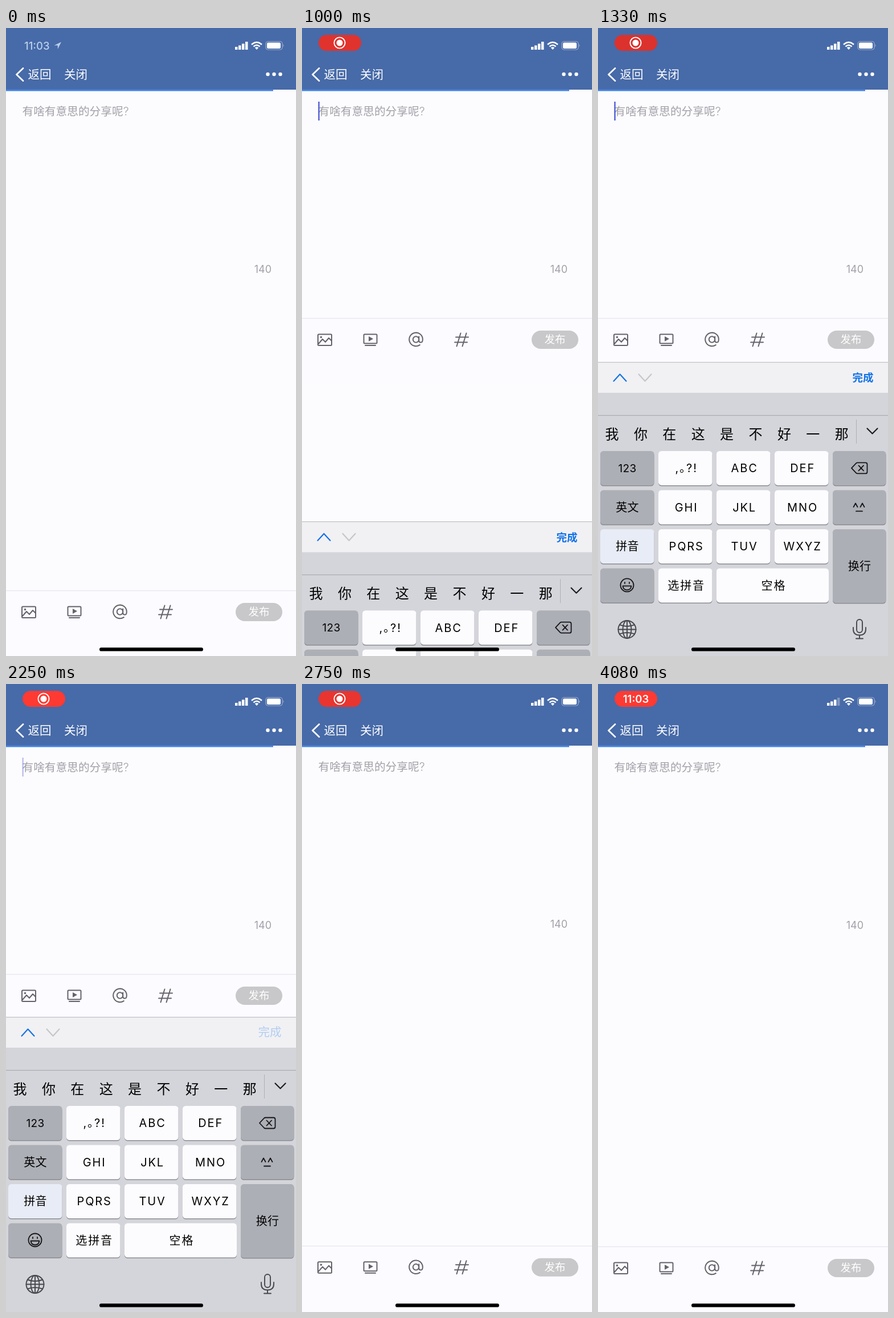
Animation, 509 px wide and 1100 px high, one loop 4160 ms. Source, as an HTML page:

```html
<!DOCTYPE html>
<html lang="zh-CN">
<head>
<meta charset="utf-8">
<style>
html, body { margin: 0; width: 100%; height: 100%; overflow: hidden; background: #fcfcfe; }
svg { display: block; width: 509px; height: 1100px; font-family: Inter, "Noto Sans CJK SC", "Noto Sans CJK", sans-serif; }
.line { fill: none; stroke-linecap: round; stroke-linejoin: round; }
</style>
</head>
<body>
<svg viewBox="0 0 509 1100">
  <rect width="509" height="1100" fill="#fcfcfe"/>
  <g id="content" fill="#a3a0a8"></g>
  <rect id="cursor" x="28.5" y="129" width="2.2" height="33" fill="#4450d0"/>

  <g id="toolbar">
    <rect width="509" height="117" fill="#fcfbff"/>
    <rect width="509" height="1.2" fill="#e6e5ef"/>
    <g class="line" stroke="#65636a" stroke-width="2">
      <rect x="28" y="28.5" width="24" height="19.5" rx="1.5"/>
      <path d="M29 45l7-8 5 5 6-7 5 5"/>
      <circle cx="33.5" cy="33.5" r=".8"/>
      <rect x="108.5" y="28.5" width="23" height="16" rx="1.5"/>
      <path d="M111 48h18"/>
      <circle cx="200" cy="37.5" r="5.2"/>
      <path d="M205.2 32.500v6.500q0 3.700 3.300 3.700 3.300 0 3.300-5.200a11.800 11.800 0 1 0-5 9.600"/>
      <path d="M270 33.5h22M268 42.5h22M278.5 26.5l-7 23M288.5 26.5l-7 23"/>
    </g>
    <path d="M117 32l8 4.5-8 4.5z" fill="#65636a"/>
    <rect x="403" y="22" width="82" height="32" rx="16" fill="#c8c8ca"/>
  </g>

  <g id="keyboard">
    <rect width="509" height="540" fill="#d4d5da"/>
    <rect width="509" height="54" fill="#f1f1f4"/>
    <rect width="509" height="1.2" fill="#bfc0c6"/>
    <rect y="93" width="509" height="1.2" fill="#a9abb1"/>
    <path class="line" d="M27.5 33.5l11-12 11 12" stroke="#1473e6" stroke-width="2.2"/>
    <path class="line" d="M71.5 21.5l11 12 11-12" stroke="#c6c6ca" stroke-width="2.2"/>
    <g id="candidates">
      <rect x="453" y="101" width="1" height="42" fill="#aeb0b6"/>
      <path class="line" d="M472.5 116.5l9 9 9-9" stroke="#1c1c1e" stroke-width="2.2"/>
    </g>
    <g id="keys"></g>
    <g class="line" stroke="#151518" stroke-width="1.8">
      <path d="M445 186l8-8.5q1-1 2.5-1h14q3 0 3 3v13q0 3-3 3h-14q-1.5 0-2.5-1zM457.5 181.5l8.5 9m0-9l-8.5 9"/>
      <path d="M448.5 254l3.5-6.5 3.5 6.5M460.5 254l3.5-6.5 3.5 6.5M453 261.5h11"/>
      <circle cx="51" cy="391" r="11.5"/>
      <path d="M43.5 392.5h15q-1 7-7.5 7t-7.5-7zM47 386v2M55 386v2"/>
    </g>
    <g class="line" stroke="#46474c" stroke-width="1.9">
      <circle cx="51" cy="468.5" r="15.5"/>
      <ellipse cx="51" cy="468.5" rx="7.5" ry="15.5"/>
      <path d="M51 453v31M35.5 468.5h31M38 460.5q13 5 26 0M38 476.5q13-5 26 0"/>
      <rect x="454" y="451" width="10" height="23" rx="5"/>
      <path d="M448 465v3q0 10.5 11 10.5t11-10.5v-3M459 478.5v6M453 484.5h12"/>
    </g>
  </g>

  <g id="header" fill="#fff">
    <rect width="509" height="108" fill="#476aa8"/>
    <rect y="107.5" width="469" height="3" fill="#4284e4"/>
    <path class="line" d="M30 70.5L18.5 81.5 30 92.5" stroke="#fff" stroke-width="2.8"/>
    <circle cx="459.5" cy="81" r="3.2"/><circle cx="470.5" cy="81" r="3.2"/><circle cx="481.5" cy="81" r="3.2"/>
    <path d="M402 33h4.5v5H402zM408 30.5h4.5V38H408zM414 27.5h4.5V38H414z"/>
    <path id="fullSignal" d="M420 24h4.5v14H420z"/>
    <path d="M431 29q9-8 18 0M434.5 32.5q5.5-5 11 0" fill="none" stroke="#fff" stroke-width="2.6"/>
    <path d="M436.8 34.5q3.2-2.5 6.4 0L440 38z"/>
    <rect x="456" y="23.5" width="29" height="14.5" rx="4" fill="none" stroke="#fff" stroke-opacity=".45" stroke-width="1.2"/>
    <rect x="458" y="25.5" width="24" height="10.5" rx="2.2"/>
    <path d="M486.5 28.5q2 2.2 0 4.5z" fill-opacity=".5"/>
    <g id="clock" fill="#bccfec"><path d="M97 24.5L84.5 30.5h6.3V37z"/></g>
    <rect id="pill" x="29" y="12" width="75" height="28" rx="14"/>
    <g id="record">
      <circle cx="66" cy="26" r="9.6" fill="none" stroke="#fff" stroke-width="1.9"/>
      <circle cx="66" cy="26" r="5.5"/>
    </g>
    <g id="pillTime"></g>
  </g>
  <rect x="164" y="1085.3" width="182" height="6.2" rx="3.1" fill="#000"/>
</svg>
<script>
const $ = id => document.getElementById(id);

function add(parent, tag, attrs, text = '') {
  const node = document.createElementNS('http://www.w3.org/2000/svg', tag);
  for (const name in attrs) node.setAttribute(name, attrs[name]);
  node.textContent = text;
  return $(parent).appendChild(node);
}
// Text placed by the vertical centre of its glyphs
const label = (parent, text, x, cy, size, anchor = 'start', extra = {}) =>
  add(parent, 'text', { x, y: cy + size * 0.37, 'font-size': size, 'text-anchor': anchor, ...extra }, text);

label('content', '有啥有意思的分享呢?', 28.5, 146, 19.7, 'start', { 'font-weight': 300 });
label('content', '140', 466, 422, 18, 'end');
label('toolbar', '发布', 444, 37.5, 18.5, 'middle', { fill: '#fff', 'font-weight': 500 });
label('header', '返回', 38.5, 81, 20.5);
label('header', '关闭', 102, 81, 20.5);
label('clock', '11:03', 32, 31, 18.5, 'start', { 'font-weight': 500 });
label('pillTime', '11:03', 66.5, 26, 18.5, 'middle', { 'font-weight': 600 });
const done = label('keyboard', '完成', 483.5, 27.5, 18.5, 'end', { fill: '#1473e6' });
[...'我你在这是不好一那'].forEach((c, i) => label('candidates', c, 24.5 + 50.4 * i, 126, 24, 'middle'));

const GREY = '#adafb6', WHITE = '#fcfcfe', PALE = '#e8ecf6';
function key(text, col, row, fill = WHITE, w = 94.5, h = 60) {
  const x = 4 + 102 * col, y = 156 + 68.5 * row;
  const box = { x, width: w, height: h, rx: 5.5 };
  add('keys', 'rect', { ...box, y: y + 1.6, fill: '#8b8d93' });
  add('keys', 'rect', { ...box, y, fill });
  const spacing = fill === WHITE ? 1.9 : 0.3;
  const size = /\d/.test(text) ? 19 : 20;
  label('keys', text, x + w / 2 + spacing, y + h / 2, size, 'middle', { 'letter-spacing': spacing });
}
['123', '英文', '拼音', ''].forEach((text, row) => key(text, 0, row, row === 2 ? PALE : GREY));
[[',｡?!', 'ABC', 'DEF'], ['GHI', 'JKL', 'MNO'], ['PQRS', 'TUV', 'WXYZ']]
  .forEach((texts, row) => texts.forEach((text, i) => key(text, i + 1, row)));
key('选拼音', 1, 3);
key('空格', 2, 3, WHITE, 197);
key('', 4, 0, GREY, 93.5);
key('', 4, 1, GREY, 93.5);
key('换行', 4, 2, GREY, 93.5, 129);

const LOOP = 4160, STEP = 1000 / 12;
const OPEN = 912, PRESS = 2160, CLOSE = 2306;
const show = (id, on) => $(id).style.display = on ? '' : 'none';
const shift = (id, y) => $(id).setAttribute('transform', `translate(0 ${y})`);
const clamp = v => Math.max(0, Math.min(1, v));
// Critically damped spring: the share of the way still to go
function remaining(ms) {
  const x = Math.max(0, ms) * 0.0185;
  return (1 + x) * Math.exp(-x);
}

function draw(t) {
  const open = t >= OPEN && t < CLOSE;
  const left = remaining(t - CLOSE);
  const scroll = t < CLOSE ? 0 : -477 * left;
  shift('content', scroll);
  shift('toolbar', open ? 508 : 985 + scroll);
  shift('keyboard', 583 + 545 * (t < CLOSE ? remaining(t - OPEN) : 1 - left));
  show('keyboard', t >= OPEN && t < 3000);
  show('candidates', open);

  const blink = (t - OPEN) / 800 % 1;
  show('cursor', open);
  $('cursor').style.opacity = blink < 0.8 ? 1 - clamp((blink - 0.55) / 0.2) : clamp((blink - 0.8) / 0.2);

  const pressed = t > PRESS && t < 2400;
  done.setAttribute('font-size', pressed ? 20.5 : 18.5);
  done.setAttribute('font-weight', t < PRESS ? 700 : 400);
  done.style.opacity = pressed ? 0.28 : t < PRESS ? 1 : 0.7;

  const recording = t >= 330, timed = t >= 3300;
  show('clock', !recording);
  show('pill', recording);
  show('record', recording && !timed);
  show('pillTime', timed);
  const glow = 0.5 + 0.5 * Math.cos((t - 2200) / 1900 * 2 * Math.PI);
  $('pill').setAttribute('fill', `rgb(${218 + 36 * glow} ${50 + 8 * glow} ${45 + 6 * glow})`);
  $('fullSignal').style.opacity = t < 3570 ? 1 : 0.3;
}

function tick() {
  const now = performance.now() % LOOP;
  draw(Math.floor((now + 5) / STEP) % 50 * STEP);
  requestAnimationFrame(tick);
}
tick();
</script>
</body>
</html>
```
